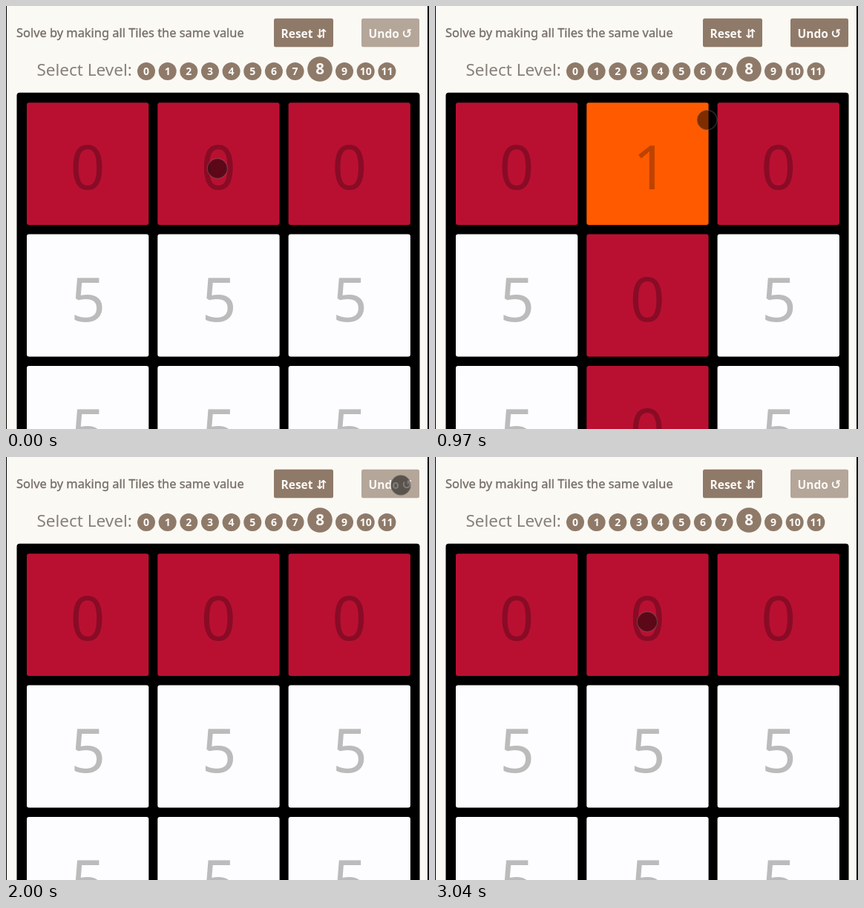
Recreate the animation shown at these times as an HTML page. Size 570 px wide and 570 px high, loop 3080 ms.

```html
<!DOCTYPE html>
<html lang="en">
<head>
<meta charset="utf-8">
<title>Tile puzzle</title>
<style>
html, body { margin: 0; width: 100%; height: 100%; overflow: hidden; background: #fbf9f4; }
svg { display: block; width: 100%; height: 100%; font-family: "Noto Sans", "Open Sans", sans-serif; }
.symbol { font-family: "DejaVu Sans", sans-serif; font-weight: 700; }
</style>
</head>
<body>
<svg id="stage" viewBox="0 0 570 570"></svg>
<script>
const LOOP = 3080;
const BROWN = '#8f7a69';
const stage = document.getElementById('stage');

// Tile colour and optical centring of the digit
const FACES = {
  0: { color: [185, 16, 50], dx: 0 },
  1: { color: [255, 90, 0], dx: 4 },
  5: { color: [253, 252, 254], dx: 0.8 }
};

const PRESS = [100, 230];
const RELEASE = [440, 590];
const UNDO = [1830, 1970];

// Pointer path: time, x, y
const PATH = [
  [0, 285, 219], [740, 285, 219], [970, 366, 154], [1210, 498, 38],
  [1330, 498, 38], [1730, 530, 38], [2000, 532, 38], [2300, 372, 163],
  [2640, 286, 220], [2790, 286, 220], [2840, 286, 222], [LOOP, 286, 222]
];

function add(name, attrs, parent = stage, content) {
  const el = document.createElementNS('http://www.w3.org/2000/svg', name);
  for (const key in attrs) el.setAttribute(key, attrs[key]);
  if (content !== undefined) el.textContent = content;
  parent.appendChild(el);
  return el;
}

function box(x, y, width, height, rx, fill, parent) {
  return add('rect', { x, y, width, height, rx, fill }, parent);
}

function label(content, x, y, size, attrs, parent) {
  return add('text', { x, y, 'font-size': size, ...attrs }, parent, content);
}

function button(x, width, word, symbol, symbolX) {
  const g = add('g', {});
  box(x, 16.7, width, 38.5, 2.5, BROWN, g);
  label(word, x + 9.5, 43, 15.5, { fill: '#fcfaf8', 'font-weight': 600 }, g);
  label(symbol, symbolX, 43, 16.5, { fill: '#fcfaf8', class: 'symbol' }, g);
  return g;
}

function level(n) {
  const big = n === 8;
  const x = n < 8 ? 189 + n * 28.65 : big ? 423 : 456 + (n - 9) * 28.7;
  const y = big ? 85 : 88;
  add('circle', { cx: x, cy: y, r: big ? 16.8 : 12, fill: BROWN });
  label(n, x, y + (big ? 7.3 : 5), big ? 20.5 : 14,
    { fill: '#fcfaf8', 'font-weight': 700, 'text-anchor': 'middle' });
}

function tile(row, col) {
  const x = 28 + col * 176.3, y = 130.3 + row * 177.3;
  const g = add('g', {});
  const face = box(x, y, 164.3, 164.8, 3, '#fff', g);
  const digit = label('', x + 82, y + 117, 82,
    { fill: '#000', 'fill-opacity': 0.26, 'text-anchor': 'middle' }, g);
  return { g, face, digit, row, col, cx: x + 82, cy: y + 82 };
}

box(0, 0, 570, 570, 0, '#fbf9f4');
label('Solve by making all Tiles the same value', 14, 42, 16.4,
  { fill: '#776e68', stroke: '#776e68', 'stroke-width': 0.35 });
button(361, 80, 'Reset', '⇵', 418);
const undo = button(479, 78, 'Undo', '↺', 533.5);
label('Select Level:', 41.5, 93.5, 22.5, { fill: '#888079' });
for (let n = 0; n < 12; n++) level(n);
box(14.5, 116.7, 543, 470, 4, '#000');
const tiles = [];
for (let row = 0; row < 3; row++)
  for (let col = 0; col < 3; col++) tiles.push(tile(row, col));
box(0, 0, 1, 570, 0, '#000');
box(568, 0, 2, 570, 0, '#000');
const pointer = add('circle', {
  r: 13.4, fill: '#000', 'fill-opacity': 0.5,
  stroke: '#8c8474', 'stroke-opacity': 0.32, 'stroke-width': 1.5
});

const mix = (a, b, k) => a + (b - a) * k;

function ease(t, [from, to]) {
  const k = Math.min(1, Math.max(0, (t - from) / (to - from)));
  return k * k * (3 - 2 * k);
}

// Velocity at a path point; zero wherever the pointer rests
function slope(i, axis) {
  const a = PATH[i - 1], b = PATH[i], c = PATH[i + 1];
  if (!a || !c) return 0;
  const before = b[axis] - a[axis], after = c[axis] - b[axis];
  return before * after > 0 ? (before + after) / (c[0] - a[0]) : 0;
}

function along(t, axis) {
  let i = 0;
  while (i < PATH.length - 2 && t >= PATH[i + 1][0]) i++;
  const a = PATH[i], b = PATH[i + 1], d = b[0] - a[0];
  const k = (t - a[0]) / d, k2 = k * k, k3 = k2 * k;
  return mix(a[axis], b[axis], 3 * k2 - 2 * k3)
    + d * ((k3 - 2 * k2 + k) * slope(i, axis) + (k3 - k2) * slope(i + 1, axis));
}

function draw(t) {
  const pressed = ease(t, PRESS) - ease(t, RELEASE);
  const changed = ease(t, RELEASE) - ease(t, UNDO);
  const swapped = t >= RELEASE[0] && t < UNDO[0];

  for (const { g, face, digit, row, col, cx, cy } of tiles) {
    const active = col === 1;
    const old = row ? 5 : 0, next = row ? 0 : 1;
    const value = active && swapped ? next : old;
    const color = FACES[old].color.map((v, i) =>
      Math.round(mix(v, FACES[next].color[i], active ? changed : 0)));
    face.setAttribute('fill', `rgb(${color})`);
    digit.textContent = value;
    digit.setAttribute('x', cx + FACES[value].dx);
    const press = active ? pressed : 0;
    g.setAttribute('opacity', 1 - 0.7 * press);
    g.setAttribute('transform',
      `translate(${cx} ${cy}) scale(${1 - 0.05 * press}) translate(${-cx} ${-cy})`);
  }
  undo.setAttribute('opacity', mix(0.65, 1, changed));
  pointer.setAttribute('cx', along(t, 1));
  pointer.setAttribute('cy', along(t, 2));
}

const start = performance.now();
function frame() {
  draw((performance.now() - start) % LOOP);
  requestAnimationFrame(frame);
}
frame();
</script>
</body>
</html>
```
